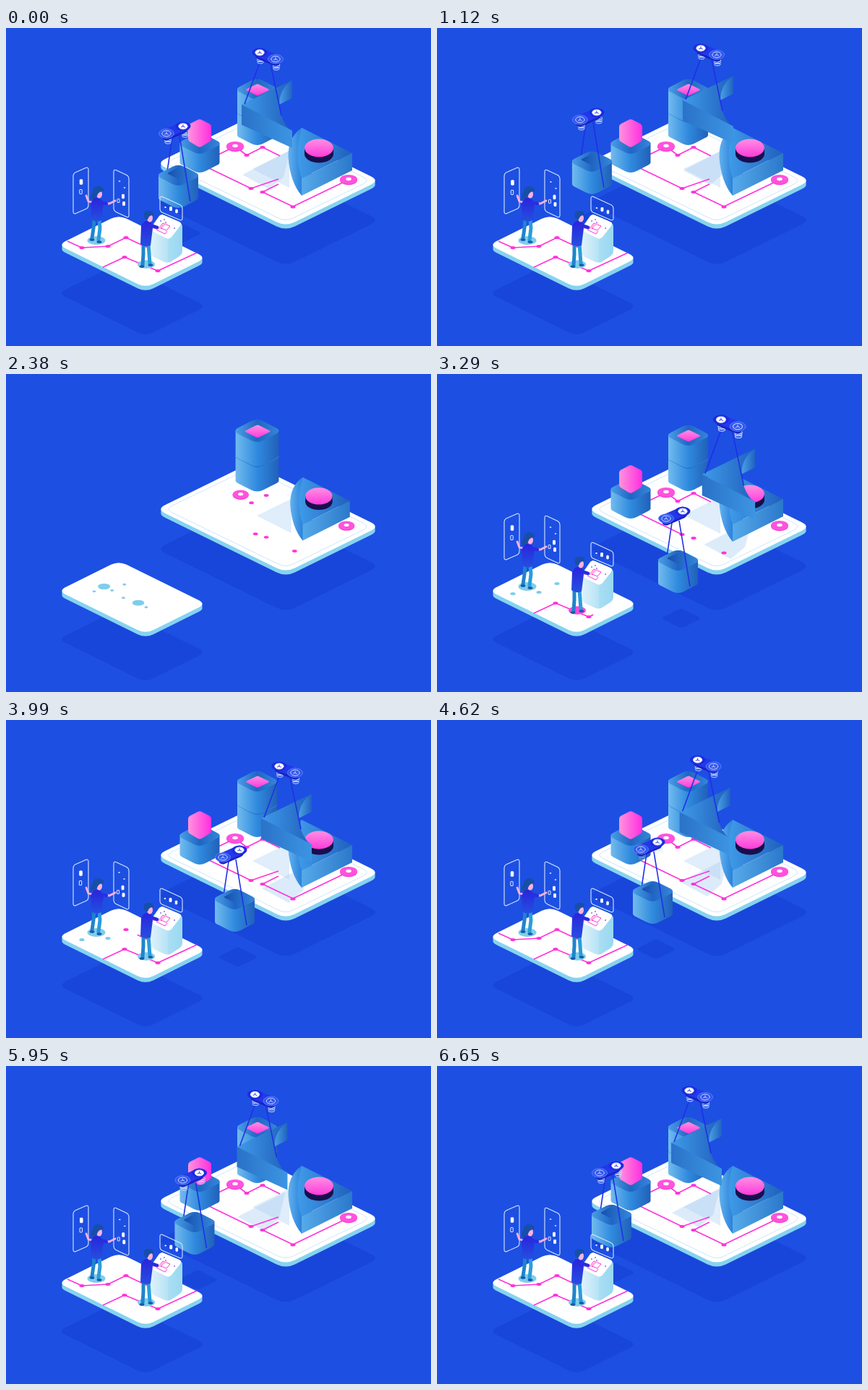
Write an HTML page that moves like this. It is 588 by 440 pixels and loops after 6720 ms.

```html
<!DOCTYPE html>
<html lang="en">
<head>
<meta charset="utf-8">
<title>Isometric assembly line</title>
<style>
html, body { margin: 0; width: 100%; height: 100%; overflow: hidden; background: #1d4fe3; }
svg { display: block; width: 588px; height: 440px; }
.a { animation: 6720ms linear infinite; }
.line { fill: none; stroke: #ff35da; stroke-width: 1.7; stroke-linejoin: round; stroke-dasharray: 1 2; }
.cable { stroke: #2130e6; stroke-width: 1.6; }
.frame { fill: none; stroke: #d5e6ff; stroke-width: 1.1; }

.slabBig { animation-name: slabBig; transform-origin: 363px 200px; }
.slabSmall { animation-name: slabSmall; transform-origin: 175px 311px; }
.tower { animation-name: tower; transform-origin: 347px 155px; }
.padBig { animation-name: padBig; transform-origin: 431px 210px; }
.padSmall { animation-name: padSmall; transform-origin: 159px 294px; }
.crate { animation-name: prop; transform-origin: 268px 165px; }
.desk { animation-name: prop; transform-origin: 222px 295px; }
.worker { animation-name: figure; transform-origin: 194px 315px; }
.hud { animation-name: figure; transform-origin: 229px 250px; }
.leftCrew { animation-name: leftCrew; transform-origin: 129px 255px; }
.lift { animation-name: lift; }
.liftIn { animation-name: liftIn; transform-origin: 238px 185px; }
.liftShade { animation-name: shade; }
.haul { animation-name: haul; }
.haulIn { animation-name: haulIn; transform-origin: 362px 113px; }
.springs { animation-name: springs; }
.bob { animation-name: bob; }
.drawA { animation-name: drawA; }
.drawB { animation-name: drawB; }
.drawC { animation-name: drawC; }
.drawD { animation-name: drawD; }
.tintA { animation-name: tintA; }
.tintB { animation-name: tintB; }
.tintC { animation-name: tintC; }
.pulse { animation-name: pulse; }

@keyframes slabBig { 0%, 18.2%, 33%, 100% { scale: 1 } 20.8%, 26% { scale: 0 } 30.2% { scale: 1.13 } }
@keyframes slabSmall { 0%, 18.2%, 33%, 100% { scale: 1 } 20.8%, 26% { scale: 0 } 30.2% { scale: 1.06 } }
@keyframes tower { 0%, 17.7%, 37.5%, 100% { scale: 1 } 20.8%, 31.5% { scale: 0 } 35.4% { scale: 1.09 } }
@keyframes padBig { 0%, 17.7%, 39%, 100% { scale: 1 } 20.8%, 31.5% { scale: 0 } 35.4% { scale: .93 } 36.8% { scale: 1.05 } }
@keyframes padSmall { 0%, 17.7%, 39.5%, 100% { scale: 1 } 20.8%, 33% { scale: 0 } 35.4% { scale: .68 } 37.4% { scale: 1.06 } }
@keyframes prop { 0%, 17.7%, 42.7%, 100% { scale: 1 } 20.8%, 36.4% { scale: 0 } 40.6% { scale: 1.1 } }
@keyframes figure { 0%, 17.7%, 45.8%, 100% { scale: 1 } 20.8%, 38.5% { scale: 0 } 43.7% { scale: 1.08 } }
@keyframes leftCrew { 0%, 20.8%, 45.8%, 100% { scale: 1 } 22.9%, 38.5% { scale: 0 } 43.7% { scale: 1.06 } }
@keyframes liftIn { 0%, 22.8%, 47.9%, 100% { scale: 1 } 22.9%, 40.6% { scale: 0 } 45.8% { scale: 1.1 } }
@keyframes haulIn { 0%, 17.7%, 50.5%, 100% { scale: 1 } 20.8%, 41.6% { scale: 0 } 46.4% { scale: 1.13 } }
@keyframes lift {
  0%, 100% { translate: 0 0 } 16.67% { translate: -24px -19px }
  18.75% { translate: -43px -31px } 19.79% { translate: -62px -43px }
  20.83% { translate: -98px -65px } 21.87% { translate: -173px -107px }
  22.92% { translate: -310px -180px } 40% { translate: 107px 60px }
  48.96% { translate: 95px 54px } 59.38% { translate: 78px 44px }
  79.17% { translate: 40px 21px } 98.96% { translate: 3px 2px }
}
@keyframes haul {
  0%, 100% { translate: 0 0 } 10.4% { translate: 9px -4px }
  16.67%, 22% { translate: 14px -6px } 40% { translate: 47px 34px }
  48.96% { translate: 42.5px 33px } 59.38% { translate: 27px 30px }
  66.7% { translate: 13px 23px } 77.1% { translate: -4px 14px }
  79.17% { translate: -6px 12px } 87.5% { translate: -7px 6px }
  98.96% { translate: -2px 0 }
}
@keyframes shade { 0%, 17.7%, 47%, 100% { opacity: 1 } 20.8%, 42% { opacity: 0 } }
@keyframes springs { 0%, 20.8%, 78%, 100% { opacity: 1 } 22.9%, 62% { opacity: 0 } }
@keyframes bob { 0%, 50%, 100% { translate: 0 0 } 16%, 79% { translate: .5px 1px } 59% { translate: -.5px -1px } }
@keyframes drawA { 0%, 20.8%, 48%, 100% { stroke-dashoffset: 0 } 20.9%, 41.6% { stroke-dashoffset: 1 } }
@keyframes drawB { 0%, 20.8%, 56%, 100% { stroke-dashoffset: 0 } 20.9%, 42% { stroke-dashoffset: 1 } 48.96% { stroke-dashoffset: .37 } }
@keyframes drawC { 0%, 20.8%, 58.5%, 100% { stroke-dashoffset: 0 } 20.9%, 49.5% { stroke-dashoffset: 1 } }
@keyframes drawD { 0%, 20.8%, 67%, 100% { stroke-dashoffset: 0 } 20.9%, 54% { stroke-dashoffset: 1 } 59.38% { stroke-dashoffset: .7 } }
@keyframes tintA { 0%, 20.8%, 47%, 100% { fill: #ff35da } 20.9%, 44% { fill: #7fcdeb } }
@keyframes tintB { 0%, 20.8%, 59%, 100% { fill: #ff35da } 20.9%, 56% { fill: #7fcdeb } }
@keyframes tintC { 0%, 20.8%, 66%, 100% { fill: #ff35da } 20.9%, 62% { fill: #7fcdeb } }
@keyframes pulse { 0%, 44%, 55%, 100% { fill: #7fcdeb } 46.5%, 52% { fill: #ff48dc } }
</style>
</head>
<body>
<svg id="stage" viewBox="0 0 588 440"></svg>
<script>
// Closed polygon with corners cut back by r.
function soft(pts, r) {
  const toward = (p, q) => {
    const k = Math.min(r / Math.hypot(q[0] - p[0], q[1] - p[1]), .5);
    return [p[0] + (q[0] - p[0]) * k, p[1] + (q[1] - p[1]) * k].map(v => v.toFixed(1));
  };
  const n = pts.length;
  return pts.map((p, i) =>
    `${i ? 'L' : 'M'}${toward(p, pts[(i + n - 1) % n])}Q${p} ${toward(p, pts[(i + 1) % n])}`).join('') + 'Z';
}
const path = (d, fill, more = '') => `<path d="${d}" fill="${fill}" ${more}/>`;
const oval = (x, y, rx, ry, fill, more = '') =>
  `<ellipse cx="${x}" cy="${y}" rx="${rx}" ry="${ry}" fill="${fill}" ${more}/>`;
const group = (name, body) => `<g class="a ${name}">${body}</g>`;
const line = (name, d) => `<path class="a line ${name}" pathLength="1" d="${d}"/>`;
const cable = (x1, y1, x2, y2) => `<line class="cable" x1="${x1}" y1="${y1}" x2="${x2}" y2="${y2}"/>`;
const limb = (d, color, w) =>
  `<path d="${d}" fill="none" stroke="${color}" stroke-width="${w}" stroke-linecap="round" stroke-linejoin="round"/>`;
const grad = (id, stops, dir = '') => `<linearGradient id="${id}" ${dir}>` +
  stops.map(([at, c]) => `<stop offset="${at}" stop-color="${c}"/>`).join('') + '</linearGradient>';
const down = 'x1="0" y1="0" x2="0" y2="1"';
const PINK = '#ff35da', CYAN = '#7fcdeb', SHADE = '#1846da', SKIN = '#ffb0dc', HAIR = '#174fa6';

const bigSlab = [[208, 187], [338, 123.5], [517, 211], [387, 274.5]];
const smallSlab = [[72, 300], [156, 258.5], [277, 318], [193, 359.5]];

function slab(pts, r) {
  const d = soft(pts, r);
  return [6, 4, 2].map(y => path(d, '#86d3f0', `transform="translate(0 ${y})"`)).join('') + path(d, '#fff');
}
const rhomb = (x, y, w, h, r) => soft([[x - w, y], [x, y - h], [x + w, y], [x, y + h]], r);

// Block with rounded upright edges: two soft rhombs joined by a band.
function cube(x, y, h) {
  const s = y + 14, end = dy => rhomb(x, s + dy, 31.5, 16, 9);
  return path(`${end(0)}${end(h)}M${x - 27.5} ${s}h55v${h}h-55Z`, 'url(#cube)') + path(end(0), 'url(#lid)');
}

function spring(x, y) {
  return [0, 2.6, 5.2].map(d => oval(x, y + d, 5 - d * .15, 2, 'none', 'stroke="#c6d8ff" stroke-width="1"')).join('');
}
function rotor(x, y, solid) {
  const tone = solid ? '#fff' : 'none';
  return oval(x, y, 10.5, 6.3, solid ? '#1a2be0' : '#3157ee', solid ? '' : 'stroke="#6f90ff" stroke-width=".7"') +
    oval(x, y, 6.2, 4, tone, 'stroke="#cfdcff" stroke-width="1"') +
    limb(`M${x - 2.5} ${y + 1}L${x} ${y}L${x + 2.5} ${y + 1.2}M${x} ${y}V${y - 2}`, solid ? '#1a2be0' : '#cfdcff', .9);
}
function drone(a, b, solidFirst) {
  const body = `M${a}L${b}`;
  return `<g transform="translate(0 3)">${limb(body, '#1a22c4', 13)}</g>` + limb(body, '#2238ea', 13) +
    rotor(...a, solidFirst) + rotor(...b, !solidFirst);
}

const chip = (x, y, w, h, full) =>
  `<rect x="${x - w / 2}" y="${y - h / 2}" width="${w}" height="${h}" rx=".6" fill="${full ? '#fff' : 'none'}" stroke="#fff" stroke-width=".9"/>`;
const frame = pts => `<path class="frame" d="${soft(pts, 4)}"/>`;
const dots = (cls, list) => list.map(([x, y]) => oval(x, y, 3.6, 2.1, PINK, cls && `class="a ${cls}"`)).join('');
const donut = (x, y) => oval(x, y + 1, 12, 6.8, '#f23bd0') + oval(x, y, 12, 6.6, '#ff52de') + oval(x, y - .5, 3.8, 2.2, '#fff');

const defs = '<defs>' +
  grad('cube', [[0, '#72bbee'], [.5, '#2f8ade'], [1, '#2160b9']]) +
  grad('lid', [[0, '#4b9ee5'], [.5, '#1f66c4'], [1, '#3685da']]) +
  grad('hole', [[0, '#174fae'], [1, '#2a78cf']]) +
  grad('pink', [[0, '#ff8fe3'], [1, '#ff3bdb']], down) +
  grad('gem', [[0, '#ff94dc'], [.5, '#ff60de'], [1, '#ff2fe0']]) +
  grad('curve', [[0, '#62b2ee'], [.5, '#2f86dc'], [1, '#1f62c2']]) +
  grad('top', [[0, '#3f9be8'], [1, '#2060bd']]) +
  grad('face', [[0, '#56aae9'], [1, '#2b78cb']]) +
  grad('bar', [[0, '#2a72c8'], [1, '#3c95e2']]) +
  grad('flag', [[0, '#4aa0e6'], [1, '#1f62c0']]) +
  grad('desk', [[0, '#dff2fb'], [1, '#94d5ef']]) +
  grad('shirt', [[0, '#2a24dc'], [1, '#2450e0']], down) +
  '</defs>';

const shadows = path(soft(bigSlab, 14), SHADE, 'transform="translate(0 55)"') +
  path(soft(smallSlab, 12), SHADE, 'transform="translate(0 67)"');

const bigPad = path('M341 195L392 170V221Z', '#a8cdf2', 'opacity=".36"') +
  line('drawA', 'M294 175L317 164L333 176L355 165L379 177') +
  line('drawB', 'M281 194L339 222L377 209') +
  line('drawC', 'M377 216L355 227L397 247L474 210') +
  donut(317, 163.5) + donut(474, 209.5) +
  dots('', [[333, 176], [355, 165], [339, 222], [355, 227], [397, 247.5]]);

const wedge =
  path('M409 138Q389.5 152 390.5 179Q393 213 409 232L424 205Z', 'url(#curve)') +
  path('M409 138L479 173L409 208Q398 176 409 138Z', 'url(#top)') +
  path('M409 208L479 173V197L409 232Z', 'url(#face)') +
  oval(433, 174.5, 20, 12, '#170f4d') + path('M413 166H453V175H413Z', '#170f4d') +
  oval(433, 166, 20, 12.5, 'url(#pink)');

const smallPad =
  line('drawD', 'M222 316L166 290L141 302L105 304L85 295') +
  line('drawB', 'M134 331L164 317L210 336L264 311') +
  dots('tintA', [[164, 317], [210, 336]]) + dots('tintB', [[166, 290]]) + dots('tintC', [[141, 302], [105, 304]]) +
  oval(125, 294, 12.5, 6, CYAN) + oval(194, 327, 12, 5.8, CYAN, 'class="a pulse"');

const tower = cube(347.5, 103, 31) + cube(347.5, 71, 31) + path(rhomb(348, 85.5, 17, 8.5, 2), 'url(#pink)');
const crate = cube(268, 146, 26) +
  path(soft([[268, 125.5], [284, 134], [284, 156], [268, 165.5], [252, 156], [252, 134]], 3), 'url(#gem)');

const desk = path(soft([[200, 277], [214, 257], [244, 270], [244, 313], [224, 326], [200, 315]], 6), 'url(#desk)') +
  path(soft([[224, 292], [244, 270], [244, 313], [224, 326]], 4), '#9edcf4', 'opacity=".5"') +
  path(soft([[200, 280], [214, 257], [244, 270], [226, 293]], 5), '#fff') +
  `<g fill="none" stroke="${PINK}" stroke-width="1">` +
  '<path d="M217 270L227 274L222 280L212 276ZM208 279L220 285L223 281M219 272L214 278"/></g>' +
  [[214, 267], [219, 265], [221, 269], [233, 277]].map(([x, y]) => oval(x, y, 1, .8, '#5a35d8')).join('');

const woman =
  limb('M122 264L121 277L119 291', '#1f84cc', 5) + limb('M129 264L130 277L128 293', '#2a9ddb', 5) +
  oval(119, 293, 3.5, 1.8, '#155aa8') + oval(129, 296, 3.5, 1.8, '#155aa8') +
  limb('M130 242L143 243L151 239', SKIN, 2.8) + limb('M119 241L114 240L111 232', SKIN, 2.8) +
  path('M121 236Q128 233 132 238L135 243L132 266Q125 270 118 265L117 243Z', 'url(#shirt)') +
  limb('M130 241L139 243', '#2a2de0', 4.5) +
  oval(129, 230, 4, 5.5, SKIN) +
  path('M120 227Q120 219 128 219Q136 220 135 226Q129 226 127 230Q126 235 118 237Q115 233 120 227Z', HAIR);

const man =
  limb('M190 299L190 313L189 328', '#1f84cc', 5) + limb('M197 299L198 312L199 326', '#2a9ddb', 5) +
  oval(188, 330, 3.5, 1.8, '#155aa8') + oval(200, 328, 3.5, 1.8, '#155aa8') +
  limb('M201 276L211 277L221 271', SKIN, 2.8) +
  path('M191 268Q199 265 202 271L203 277L200 301Q192 304 186 299L187 274Z', 'url(#shirt)') +
  limb('M200 273L209 276', '#2a2de0', 4.5) +
  oval(199, 263, 4, 5.5, SKIN) +
  path('M191 262Q189 253 197 253Q205 253 204 259Q198 259 197 263Q195 268 191 262Z', HAIR);

const panels =
  frame([[93, 201], [114, 192], [114, 249], [93, 258]]) + frame([[149, 195], [170, 205], [170, 263], [149, 253]]) +
  group('bob', chip(104, 213, 3.6, 6.5, true) + chip(103.5, 226.5, 3.4, 6) +
    oval(157, 212, 1.4, .8, '#fff') + oval(164, 221, 1.4, .8, '#fff') +
    chip(162, 233, 3, 5.5, true) + chip(155.5, 239, 3, 5) + chip(163, 243, 3, 5, true));
const hud = frame([[213, 232], [244, 246], [244, 267], [213, 254]]) +
  group('bob', oval(220.5, 248, 1.3, 1, '#fff') + chip(228, 250, 3, 5, true) + chip(236, 253.5, 2.6, 4.6, true));

const lift = cable(230, 152, 223, 199) + cube(238.5, 190, 31) + path(rhomb(238.5, 201, 16, 8, 3), 'url(#hole)') +
  cable(240, 149, 255, 240) +
  group('springs', spring(224, 153) + spring(248, 144)) + drone([222, 146], [245, 136], false);

const haul =
  path('M326 106L396 72Q378 84 378 106Q380 130 396 144Z', 'url(#top)') +
  path('M396 72V97L378 106Q378 84 396 72Z', 'url(#flag)') +
  path('M326 106L396 142V166L326 134Z', 'url(#bar)') +
  cable(351, 48, 330, 105) + cable(366, 50, 381, 121) +
  spring(352, 42) + spring(374, 51) + drone([351, 34], [373, 43], true);

document.getElementById('stage').innerHTML = defs + shadows +
  group('lift', group('liftShade', path(rhomb(243, 284, 28, 14, 5), SHADE))) +
  group('slabBig', slab(bigSlab, 14) +
    `<path d="${soft([[220, 187], [338, 130], [504, 211], [387, 268]], 11)}" fill="none" stroke="#cfe7f8"/>`) +
  group('haul', group('liftShade', path('M327 203L393 169L384 206L364 223Z', '#a8cdf2', 'opacity=".4"'))) +
  group('padBig', bigPad) + group('tower', tower) + group('crate', crate) +
  group('padBig', wedge) +
  group('haul', group('haulIn', haul)) +
  group('slabSmall', slab(smallSlab, 12)) + group('padSmall', smallPad) +
  group('lift', group('liftIn', lift)) +
  group('leftCrew', panels + woman) +
  group('desk', desk) + group('worker', man) + group('hud', hud);
</script>
</body>
</html>
```
